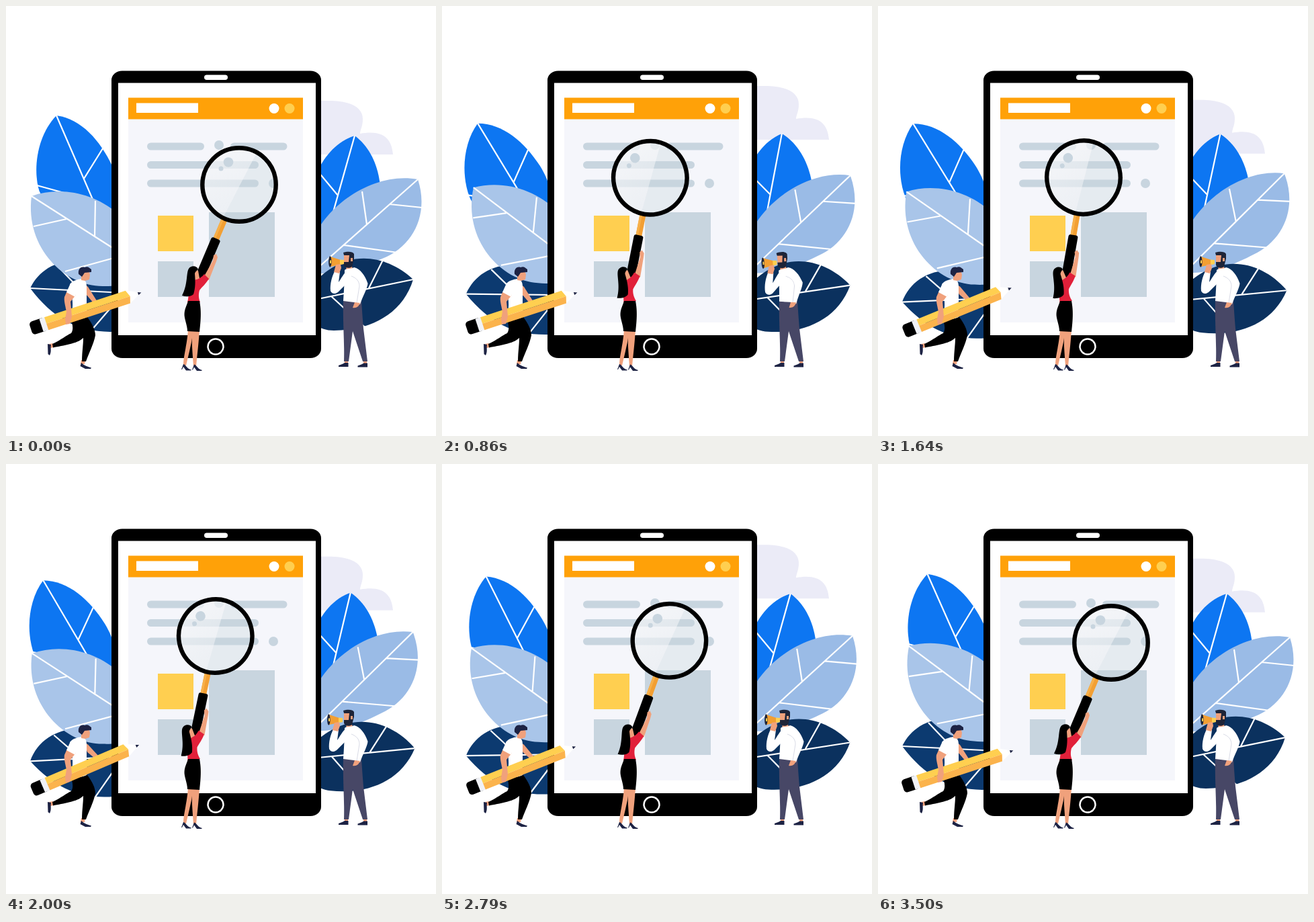
Recreate the animation shown at these times as an HTML page. Size 640 px wide and 640 px high, loop 3.57 s.

```html
<!DOCTYPE html>
<html lang="en">
<head>
<meta charset="utf-8">
<title>Page search</title>
<style>
  html, body { margin: 0; height: 100%; overflow: hidden; background: #fff; }
  svg { display: block; width: 100vw; height: 100vh; }
  .vein { fill: none; stroke: #fff; stroke-width: 2.2; }
  .skin { fill: #f0a17c; }
  .navy { fill: #1d2344; }
  .grey { fill: #c8d5df; }
  .white { fill: #fff; }
  .yellow { fill: #ffcf50; }
  .orange { fill: #f29f33; }
</style>
</head>
<body>
<svg viewBox="0 0 640 640">
  <defs>
    <linearGradient id="shine" x1=".1" y1="0" x2=".5" y2="1">
      <stop offset="0" stop-color="#f6f7f9" stop-opacity=".75"/>
      <stop offset="1" stop-color="#e6ebef" stop-opacity=".6"/>
    </linearGradient>
    <clipPath id="glass"><circle r="53"/></clipPath>
  </defs>

  <path id="cloud" fill="#ebebf7" d="M460 141H480C515 141 531 152 531 168C531 180 527 184 527 190C560 184 574 196 576 221H460Z"/>

  <!-- leaves -->
  <g id="leftDark">
    <path fill="#0c3a70" d="M36 420C55 380 105 365 160 395Q205 418 256 431C220 470 180 485 155 485C105 484 70 465 36 420Z"/>
    <path class="vein" d="M36 420L256 431M75 385L112 424M126 484L175 427"/>
  </g>
  <g id="leftBlue">
    <path fill="#0d76f2" d="M75 163C49 190 40 235 48 270C55 300 100 330 149 328C175 300 172 270 158 238C140 200 112 168 75 163Z"/>
    <path class="vein" d="M75 163L149 334M144 212L116 257M46 267L130 290"/>
  </g>
  <g id="leftPale">
    <path fill="#a9c5e9" d="M38 283C80 268 130 278 165 308C195 335 205 365 204 388C195 412 165 418 145 417C90 418 28 362 38 283Z"/>
    <path class="vein" d="M38 283L204 389M133 290L132 344M41 328L90 317M88 395L186 368"/>
  </g>
  <g id="rightBlue">
    <path fill="#0d76f2" d="M519 193C490 202 470 228 460 255C452 290 460 325 477 342C520 330 550 300 557 268C554 238 542 210 519 193Z"/>
    <path class="vein" d="M519 193L477 342M460 241L494 282"/>
  </g>
  <g id="rightPale">
    <path fill="#9abbe6" d="M613 258C560 248 500 280 469 325C455 350 450 380 456 397C500 402 540 385 560 376C606 358 630 310 613 258Z"/>
    <path class="vein" d="M613 258L456 397M619 300L571 295M583 367L503 356M530 276L537 325"/>
  </g>
  <g id="rightDark">
    <path fill="#0b315e" d="M606 407C575 378 535 368 500 382C470 395 455 415 440 438C448 470 465 483 488 483C540 483 590 460 606 407Z"/>
    <path class="vein" d="M606 407L455 438M561 378L540 420M534 478L484 432"/>
  </g>

  <!-- tablet -->
  <rect x="157" y="96.5" width="312" height="427.5" rx="16" ry="14"/>
  <rect class="white" x="167" y="114.5" width="294" height="375.5"/>
  <rect class="white" x="295" y="102.5" width="35" height="7.5" rx="3.75"/>
  <circle cx="312" cy="507" r="11.5" fill="none" stroke="#fff" stroke-width="2.5"/>
  <rect x="182" y="137" width="260" height="334" fill="#f5f6fb"/>
  <rect x="182" y="136.5" width="260" height="32" fill="#ffa108"/>
  <rect class="white" x="194" y="144.5" width="92" height="14.5"/>
  <circle class="white" cx="399" cy="152.5" r="7.5"/>
  <circle class="yellow" cx="422" cy="152.5" r="7.5"/>
  <path d="M215.500 209H289.500M339.500 209H413M215.500 236.500H370.500M215.500 264H370.500" stroke="#c8d5df" stroke-width="11" stroke-linecap="round"/>
  <g class="grey">
    <circle cx="317" cy="207" r="7"/>
    <circle cx="398" cy="264" r="7"/>
    <rect x="226" y="380" width="53" height="53"/>
    <rect x="302" y="307" width="98" height="126"/>
  </g>
  <rect class="yellow" x="226" y="312" width="53" height="53"/>

  <!-- woman -->
  <g class="skin">
    <path d="M271 482L278 484C277 500 274 508 273 514L268 535H264C264 520 269 508 271 482Z"/>
    <path d="M277 482H288C287 500 285 515 283 536H279C278 520 276 505 277 482Z"/>
  </g>
  <g class="navy">
    <path id="heel" d="M264 533C268 534 269 540 276 541.5L275 542.5H268L264 537L262 541H261Z"/>
    <use href="#heel" x="16" y=".5"/>
  </g>
  <g id="woman">
    <g transform="translate(347 266)">
      <g transform="rotate(23)">
        <rect class="orange" x="-4.5" y="55" width="9" height="35"/>
        <rect x="-4.5" y="55" width="3.5" height="35" fill="#f7b04a"/>
        <rect x="-7" y="87" width="14" height="64" rx="3"/>
      </g>
      <g clip-path="url(#glass)">
        <path d="M30 -55L-27 55H-60V-55Z" fill="url(#shine)"/>
        <path d="M30 -55L-27 55H60V-55Z" fill="#c8d4dc" fill-opacity=".36"/>
      </g>
      <circle class="grey" cx="-16" cy="-33.5" r="7.3"/>
      <circle class="grey" cx="-27" cy="-24" r="3.5"/>
      <circle r="54.7" fill="none" stroke="#000" stroke-width="6.4"/>
    </g>
    <path class="skin" d="M295 402L308 379L309 371L313 369L315 374L313 380L302 408Z"/>
    <path class="skin" d="M276 392L286 394L288 405L284 407L283 412H276Z"/>
    <path fill="#e1203a" d="M274 412C281 406 288 408 295 399L302 406C297 414 292 418 288 423C286 430 287 436 289 441H270C273 430 271 420 274 412Z"/>
    <path d="M286 392C284 386 275 386 272 391C268 397 271 414 262 431C268 433 275 433 279 429C282 420 282 410 281 398C282 395 284 394 286 392Z"/>
  </g>
  <path d="M271 439H288C290 450 291 460 288 485L270 484C270 475 265 465 265.5 458C266 450 269 446 271 439Z"/>

  <!-- man with pencil -->
  <path id="farArm" class="skin" d="M117 414L122 418L134 437L138 442L131 443L119 429Z"/>
  <path class="skin" d="M64 503L70 502L71 508L66 509ZM112 527H118L117 533H111Z"/>
  <path class="navy" d="M62 503L67 504C66 510 68 514 65 520L62.5 518Z"/>
  <path class="navy" d="M112 531C116 535 122 537 127 538.5L126 540H118L110.5 536Z"/>
  <path d="M96 465L121 463C128 472 133 482 133 490C131 502 124 515 119 529H113C113 515 115 506 115 494C106 503 85 505 70 508.5L69 503C82 497 90 490 97 487C101 482 99 472 96 465Z"/>
  <path class="white" d="M95 414C100 408 107 407 112 406C118 407 120 411 120 418V463C112 467 102 467 96 465C100 450 100 438 97 430Z"/>
  <path class="skin" d="M112 394L123 393L125 400L124 407L118 409L112 408Z"/>
  <path class="navy" d="M108 399C107 392 111 387 117 389C122 387 124 390 127 392V396L117 397L113 403Z"/>
  <g id="pencil">
    <g transform="translate(102 459) rotate(-18.1)">
      <rect x="-68.5" y="-10" width="24" height="20" rx="5"/>
      <rect x="-52" y="-10" width="10" height="20" fill="#f0f2f7"/>
      <path class="white" d="M84 -10L104 0L84 10Z"/>
      <path class="yellow" d="M-44 -10H83L87 0H-44Z"/>
      <path d="M-44 0H87L84 10H-44Z" fill="#fbb34c"/>
      <path class="navy" d="M99.5 -2.2L104.5 0L99.5 2.2Z"/>
    </g>
  </g>
  <path class="skin" d="M91 424L104 430L96 440L98 462L95 473L89 474L88 466L90 455C88 445 86 438 87 433Z"/>
  <path class="white" d="M95 415C99 411 104 411 108 414L103 433L90 426Z"/>

  <!-- man with megaphone -->
  <path class="skin" d="M504 527H509V533H504ZM532 527H537V533H532Z"/>
  <g class="navy">
    <path id="shoe" d="M495 535C500 533 503 532 504 531H509.5V537H495Z"/>
    <use href="#shoe" x="28.500" y=".5"/>
  </g>
  <path fill="#474766" d="M502 438H529C530 455 531 468 532 480L538 529H531L516 484L510 529H503C504 500 501 470 502 438Z"/>
  <g id="speaker">
    <path class="skin" d="M503 370H513V383L517 393L506 394L507 386L503 384Z"/>
    <path class="white" d="M504 393C508 390 513 392 518 389C527 391 534 400 538.5 413C538 420 531 432 527 444L518 441L502 439C503 425 504 405 504 393Z"/>
    <path d="M514 402C522 405 526 410 526 417L522 442" fill="none" stroke="#d9dbe6"/>
    <path class="skin" d="M519 441L527 442C525 447 522 450 516 449Z"/>
    <path fill="#1e2438" d="M502 367C508 365 516 365 518 369V376L515 388C511 391 505 390 503 386V381L510 381L511 371H503Z"/>
    <path class="skin" d="M513 375H516V380H513Z"/>
    <g id="horn">
      <path class="white" d="M510 392C502 398 499 406 495 411L497 396L489 395C485 403 482 414 483 424C485 429 490 429 494 426L508 412Z"/>
      <path class="orange" d="M483 373L498 378V385L483 388Z"/>
      <path class="yellow" d="M497 377.5L503 378V384L497 385.5Z"/>
      <ellipse cx="482.3" cy="380.5" rx="2.2" ry="8.3" fill="#1e2438"/>
      <path class="yellow" d="M482 378.5H484V383H482Z"/>
      <path class="skin" d="M491 385L498 384L499 390L496 398L488 396Z"/>
    </g>
  </g>
</svg>
<script>
const LOOP = 3570, STEPS = 50, STEP = LOOP / STEPS;

function ease(x, from, to) {
  const p = Math.min(1, Math.max(0, (x - from) / (to - from)));
  return (1 - Math.cos(Math.PI * p)) / 2;
}

// Goes out between steps a and b, comes back between c and d.
const swing = (x, a, b, c, d) => ease(x, a, b) - ease(x, c, d);

function place(id, transform) {
  document.getElementById(id).setAttribute("transform", transform);
}
const turn = (id, degrees, x, y) => place(id, `rotate(${degrees} ${x} ${y})`);

function pose(step) {
  place("cloud", `translate(0 ${-22 * swing(step % 25, 0, 12, 12, 25)})`);

  turn("leftBlue", -8.7 * swing(step, 0, 15, 17, 55), 149, 328);
  turn("leftPale", 4.6 * swing(step % 31, 0, 13, 15, 31), 204, 388);
  turn("leftDark", -5.8 * swing(step, 0, 28, 32, 49), 256, 431);
  turn("rightBlue", -5 * swing(step, 0, 10, 13, 42), 477, 342);
  turn("rightPale", -3.3 * swing(step, 0, 20, 23, 47), 456, 397);
  turn("rightDark", 6.1 * swing(step, 0, 23, 27, 50), 455, 438);

  turn("woman", -13.1 * swing(step, 0, 15, 22, 46.5), 279, 440);
  const lift = swing(step, 15, 26, 34, 48);
  turn("pencil", -5 * lift, 102, 459);
  turn("farArm", -10 * lift, 119, 418);
  turn("speaker", -6 * swing(step, 0, 8, 8, 17), 515, 440);
  place("horn", `translate(${-2 * swing(step, 8, 16, 33, 39)} 0)`);
}

function draw() {
  const t = performance.now() % LOOP;
  // Starts each step slightly early to absorb timer rounding.
  pose(Math.min(STEPS - 1, Math.floor((t + 8) / STEP)));
  requestAnimationFrame(draw);
}
draw();
</script>
</body>
</html>
```
